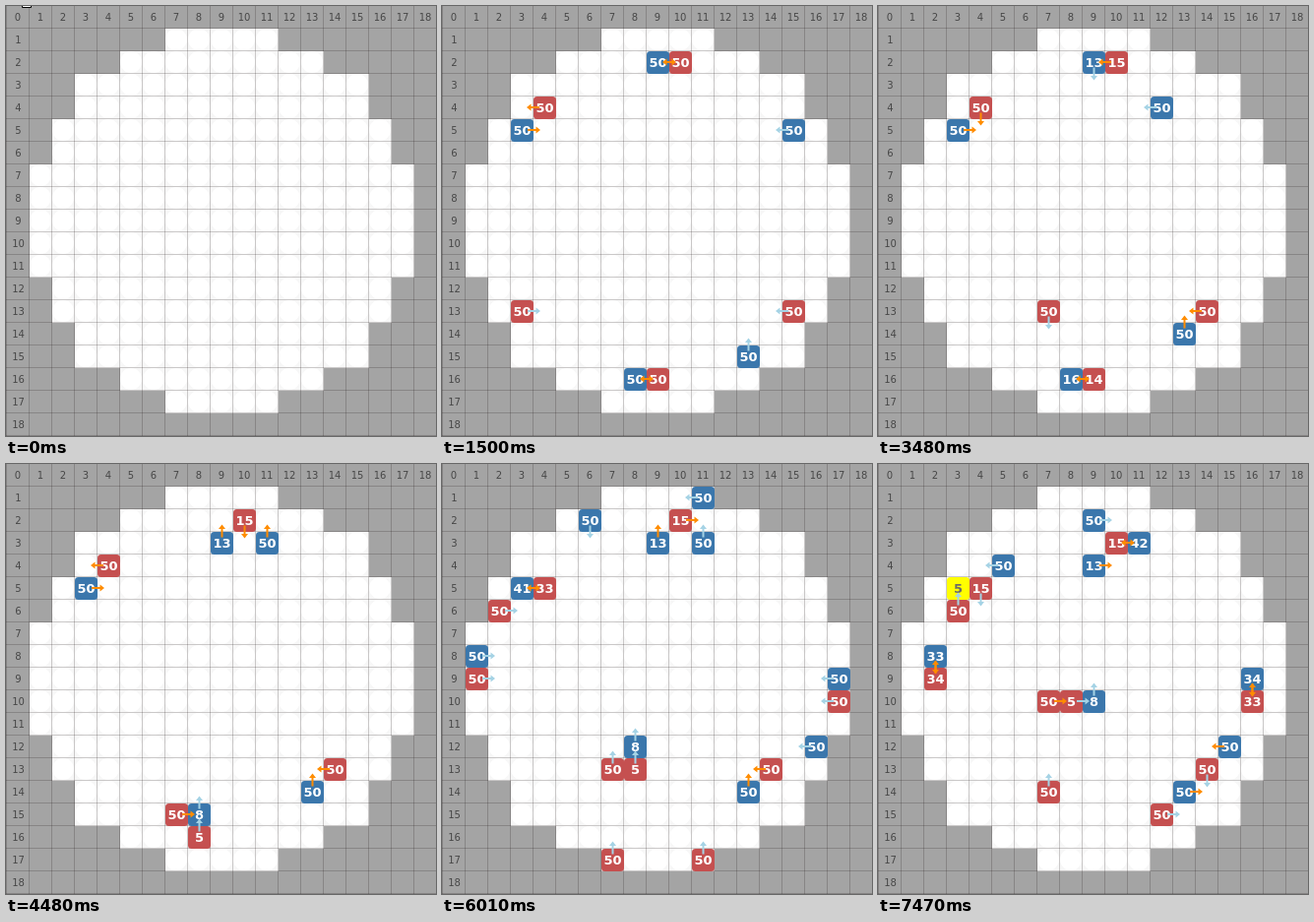
These frames come from a looping animation (437 by 437 pixels, 8 s). An HTML page with a canvas:

```html
<!DOCTYPE html>
<html lang="en">
<head>
<meta charset="utf-8">
<title>Grid robots</title>
<style>
  html, body { margin: 0; width: 100%; height: 100%; overflow: hidden; background: #a4a4a4; }
  canvas { display: block; width: 437px; height: 437px; }
</style>
</head>
<body>
<canvas id="stage" width="437" height="437"></canvas>
<script>
const ctx = document.getElementById('stage').getContext('2d');
const CELL = 23, COUNT = 19, SIZE = 437, LOOP = 8000;
const FONT = '"DejaVu Sans", Verdana, sans-serif';
const BLUE = '#3b77ac', RED = '#c55050';
const TURNS = [970, 1500, 2030, 2490, 3020, 3480, 3980, 4480, 5010, 5510, 6010, 6510, 7010, 7470];
const STEP = { u: [0, -1], d: [0, 1], l: [-1, 0], r: [1, 0] };

// One action per turn: lower case moves, upper case attacks, "!" is the yellow last stand.
// Hits are the health lost on consecutive turns, beginning at hitTurn.
const robot = (color, col, row, actions, hitTurn = 0, hits = []) =>
  ({ color, col, row, actions, hitTurn, hits, born: TURNS.length - actions.length });

const robots = [
  robot(BLUE, 9, 1, 'dRRRRdUUUUUUdR', 2, [9, 10, 9, 9]),
  robot(RED, 10, 1, 'dLLLLLLDDDRdRR', 2, [8, 9, 9, 9]),
  robot(BLUE, 8, 17, 'uRRRRRuuuuuuru', 2, [8, 9, 8, 9, 8]),
  robot(RED, 9, 17, 'uLLLLLluuuuuur', 2, [9, 10, 9, 8, 9]),
  robot(BLUE, 3, 4, 'dRRRRRRRRRRRR!', 10, [9, 8, 18, 10]),
  robot(RED, 4, 3, 'dLDLLDLLdLLLLd', 9, [8, 9, 9, 9]),
  robot(BLUE, 16, 5, 'lllluluUUUuLdL', 11, [8]),
  robot(RED, 2, 13, 'rrrrrddRuuuuuR'),
  robot(RED, 15, 14, 'ulLDDLLLLLLUUd'),
  robot(BLUE, 14, 15, 'luUUUUUUUUUUUR'),

  robot(BLUE, 11, 1, 'lldr'),
  robot(BLUE, 6, 2, 'ddll'),
  robot(BLUE, 16, 12, 'lLLL'),
  robot(RED, 2, 6, 'rUUu'),
  robot(RED, 7, 17, 'uuuu'),
  robot(RED, 11, 17, 'uurr'),
  robot(RED, 1, 9, 'rUUU', 12, [8, 8]),
  robot(BLUE, 1, 8, 'rDDD', 12, [8, 9]),
  robot(RED, 17, 10, 'lUUU', 12, [8, 9]),
  robot(BLUE, 17, 9, 'lDDD', 12, [8, 8])
];

function stateAt(bot, turn) {
  let { col, row } = bot;
  const age = turn - bot.born;
  for (const action of bot.actions.slice(0, age)) {
    const [dx, dy] = STEP[action] || [0, 0];
    col += dx;
    row += dy;
  }
  const hp = bot.hits.slice(0, Math.max(0, turn - bot.hitTurn + 1)).reduce((left, hit) => left - hit, 50);
  return { x: col * CELL + 1, y: row * CELL, hp, color: bot.color, action: bot.actions[age] };
}

function label(text, x, y, font, color) {
  ctx.font = `${font} ${FONT}`;
  ctx.fillStyle = color;
  ctx.textAlign = 'center';
  ctx.textBaseline = 'alphabetic';
  ctx.fillText(text, x, y);
}

function drawBoard() {
  ctx.fillStyle = '#a4a4a4';
  ctx.fillRect(0, 0, SIZE, SIZE);
  for (let row = 0; row < COUNT; row++) {
    for (let col = 0; col < COUNT; col++) {
      if ((col - 9) ** 2 + (row - 9) ** 2 > 72) continue;
      const x = col * CELL + 1, y = row * CELL;
      ctx.fillStyle = '#f7f7f7';
      ctx.fillRect(x, y, CELL, CELL);
      ctx.fillStyle = '#fff';
      ctx.beginPath();
      ctx.arc(x + 11, y + 11, 11, 0, 2 * Math.PI);
      ctx.fill();
    }
  }
  ctx.fillStyle = 'rgba(20, 10, 10, .2)';
  for (let i = 0; i <= COUNT; i++) {
    ctx.fillRect(i * CELL, 0, 1, SIZE);
    ctx.fillRect(0, i * CELL - 1, SIZE, 1);
  }
  for (let i = 0; i < COUNT; i++) {
    label(i, i * CELL + 12, 15, '10px', '#484848');
    if (i) label(i, 12.5, i * CELL + 15, '10px', '#484848');
  }
}

function drawRobot({ x, y, hp, color, action }) {
  const lastStand = action === '!';
  ctx.fillStyle = lastStand ? '#ff0' : color;
  ctx.beginPath();
  ctx.roundRect(x, y, CELL, CELL, 3.5);
  ctx.fill();
  label(hp, x + 11.5, y + 16, 'bold 13px', lastStand ? '#6a6a6a' : '#fff');
}

function drawArrow({ x, y, action }) {
  const step = STEP[action.toLowerCase()];
  if (!step) return;
  const [dx, dy] = step;
  ctx.save();
  ctx.translate(x + 11.5 + dx * 11.5, y + 11 + dy * 11.5);
  ctx.rotate(Math.atan2(dy, dx));
  ctx.fillStyle = action === action.toUpperCase() ? '#ff8c00' : '#a5d3e5';
  ctx.fillRect(-6, -1, 9, 2);
  ctx.beginPath();
  ctx.moveTo(2.5, -3.5);
  ctx.lineTo(7, 0);
  ctx.lineTo(2.5, 3.5);
  ctx.fill();
  ctx.restore();
}

// Lower part of a hand pointer; x, y is the bottom left of the wrist.
function drawPointer(time) {
  if (time >= 570) return;
  const enter = time < 30 ? 0 : Math.min(4, Math.floor((time - 30) / 40) + 1) / 4;
  const leave = time < 450 ? 0 : (Math.floor((time - 450) / 30) + 1) / 5;
  const x = Math.round(16 + 5 * enter - 30 * leave);
  const y = Math.round(2 + 11 * enter - 10 * leave);
  ctx.save();
  ctx.translate(x + .5, y - .5);
  ctx.beginPath();
  [[0, 0], [0, -3], [-5, -9], [-4, -11], [-1, -9], [-1, -18], [2, -18], [2, -13], [11, -11], [11, -6], [9, -3], [9, 0]]
    .forEach(([px, py]) => ctx.lineTo(px, py));
  ctx.closePath();
  ctx.fillStyle = '#fff';
  ctx.strokeStyle = '#000';
  ctx.lineWidth = 1;
  ctx.fill();
  ctx.stroke();
  ctx.restore();
}

function draw(now) {
  const time = now % LOOP;
  const turn = TURNS.filter(start => start <= time).length - 1;
  const states = robots.filter(bot => bot.born <= turn).map(bot => stateAt(bot, turn));
  drawBoard();
  states.forEach(drawRobot);
  states.forEach(drawArrow);
  drawPointer(time);
}

const start = performance.now();
function tick() {
  draw(performance.now() - start);
  requestAnimationFrame(tick);
}
tick();
</script>
</body>
</html>
```
